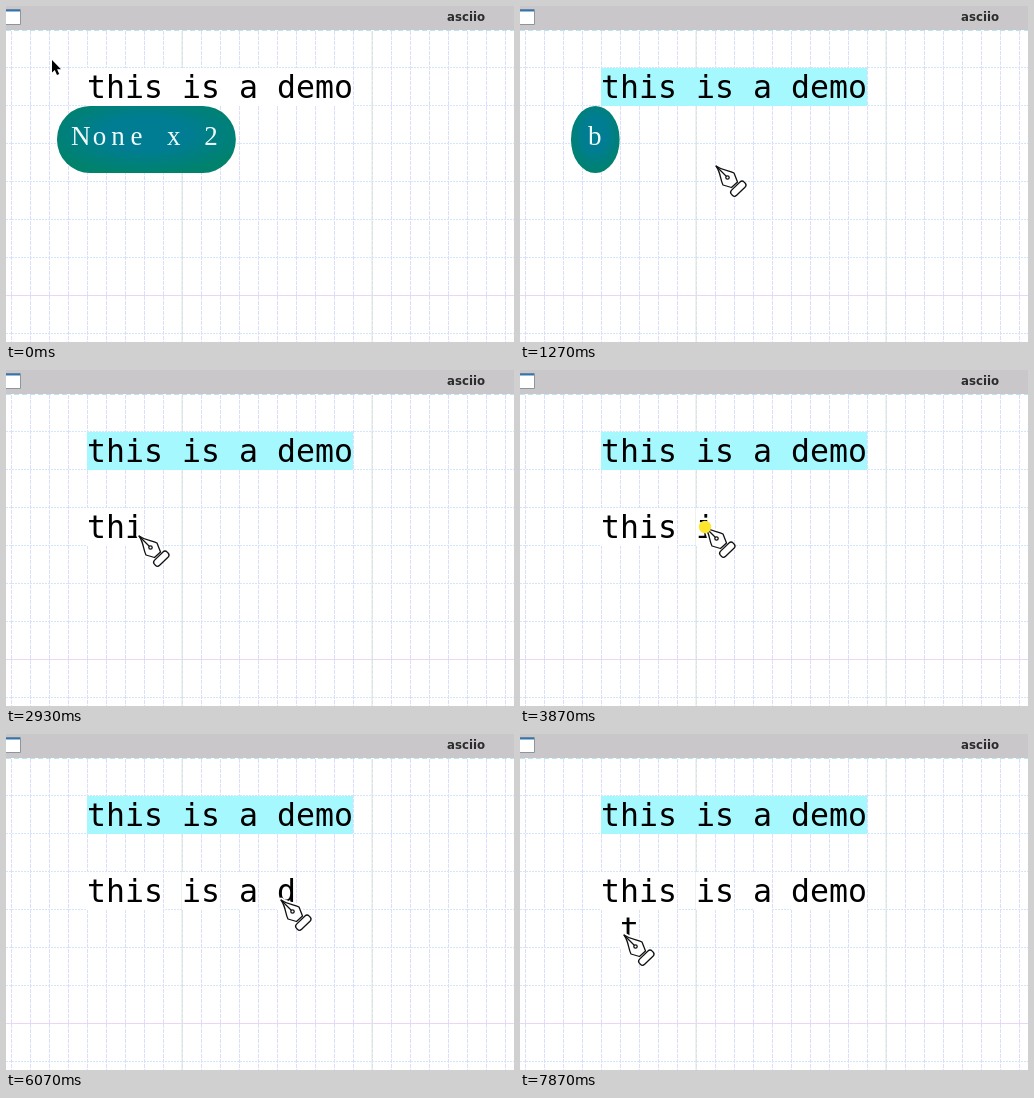
An HTML page that plays this animation: 508x336 px, repeating every 8 s.

```html
<!DOCTYPE html>
<html lang="en">
<head>
<meta charset="utf-8">
<title>asciio</title>
<style>
html, body { margin: 0; width: 100%; height: 100%; overflow: hidden; background: #fff; }
svg { display: block; }
text { white-space: pre; }
.mono { font: 31.56px "DejaVu Sans Mono", monospace; }
.key { font: 27px "Liberation Serif", serif; fill: #eefaf8; text-anchor: middle; }
.title { font: bold 11.75px "DejaVu Sans", sans-serif; fill: #2c2c2c; }
</style>
</head>
<body>
<svg width="508" height="336" viewBox="0 0 508 336">
  <defs>
    <radialGradient id="teal" cx=".5" cy=".42" r=".62">
      <stop offset=".4" stop-color="#007d92"/>
      <stop offset=".95" stop-color="#00826c"/>
    </radialGradient>
    <path id="nib" d="M0 0C7 5 13 4 18 7L21.5 16 15.5 21.5 7 19C4 13 5 7 0 0Z"/>
  </defs>
  <rect width="508" height="336" fill="#fff"/>
  <g id="grid" fill="none"></g>
  <rect id="label" x="81" y="62" width="266" height="38"/>
  <text class="mono" x="81" y="92">this is a demo</text>
  <g id="cells"></g>
  <path id="arrow" d="M0 0V12.5L2.8 10 5 15 7.2 14 5.1 9.2H9Z" stroke="#fff" paint-order="stroke"/>
  <g id="pill"></g>
  <g id="pen" fill="#fff" stroke="#111" stroke-width="1.3" stroke-linejoin="round">
    <use href="#nib" stroke="#fff" stroke-width="5"/>
    <use href="#nib"/>
    <path d="M0 0L10.5 10.5"/>
    <circle cx="11.5" cy="11.5" r="1.7"/>
    <rect x="-8.8" y="-3.6" width="17.6" height="7.2" rx="3" transform="translate(22.3 22.7) rotate(-44)"/>
  </g>
  <circle id="dot" r="6.2" fill="#ffe62e"/>
  <rect width="508" height="24" fill="#c9c7c9"/>
  <path d="M0 24.5H508" stroke="#b9e6ee" stroke-dasharray="5 3"/>
  <path d="M-1 3.5H14.5V18.5H-1" fill="#fff" stroke="#8f959c"/>
  <path d="M0 4.5H14" stroke="#3474ad" stroke-width="2"/>
  <text class="title" x="441" y="14.5">asciio</text>
</svg>
<script>
const NS = "http://www.w3.org/2000/svg";
const $ = id => document.getElementById(id);
const LOOP = 8000, STEP = 200 / 3, CELL = 19, ROW = 38;
const SELECT = 333, PEN = 1267, PILL_END = 2867, DOT = 133;

// Each word is stamped letter by letter; x, y is the pen tip at its first letter
const words = [
  { text: "this", col: 0, row: 3, start: 1867, gap: 433, x: 95, y: 166 },
  { text: "is", col: 5, row: 3, start: 3867, gap: 667, x: 185, y: 157 },
  { text: "a", col: 8, row: 3, start: 5333, gap: 0, x: 245, y: 156 },
  { text: "demo", col: 10, row: 3, start: 5867, gap: 400, x: 275, y: 166 },
  { text: "t", col: 1, row: 4, start: 7600, gap: 0, x: 104, y: 201 }
];
const stops = [
  { at: 0, x: 46, y: 54 }, { at: 400, x: 150, y: 86 }, { at: 667, x: 196, y: 160 }
];
const stamps = [];

function add(parent, name, attrs, text) {
  const el = document.createElementNS(NS, name);
  for (const k in attrs) el.setAttribute(k, attrs[k]);
  if (text) el.textContent = text;
  return parent.appendChild(el);
}

function drawGrid() {
  const grid = $("grid");
  for (let y = 61; y < 336; y += ROW)
    add(grid, "path", { d: `M0 ${y + .5}H508`, stroke: "#d3e6fb", "stroke-dasharray": "2 1" });
  for (let x = 5; x < 508; x += CELL)
    add(grid, "path", { d: `M${x + .5} 25V336`, stroke: "#dcdffb", "stroke-dasharray": "4 1" });
  add(grid, "path", { d: "M0 289.5H508", stroke: "#ecd6f6" });
  add(grid, "path", { d: "M176 25V336M366 25V336", stroke: "#d8e8da" });
}

function makePill(keys) {
  const pitch = 18.6, g = add($("pill"), "g", {});
  add(g, "rect", { x: 51, y: 100, width: keys.length * pitch + 30, height: 67, rx: 33, fill: "url(#teal)" });
  [...keys].forEach((ch, i) =>
    add(g, "text", { x: 65.5 + (i + .5) * pitch, y: 139, class: "key" }, ch));
  return g;
}

function addWord({ text, col, row, start, gap, x, y }) {
  [...text].forEach((ch, i) => {
    const at = start + i * gap, left = 81 + (col + i) * CELL, top = 24 + row * ROW;
    const el = add($("cells"), "g", {});
    add(el, "rect", { x: left, y: top, width: CELL, height: ROW, fill: "#fff" });
    add(el, "text", { x: left, y: top + 30, class: "mono" }, ch);
    stamps.push({ el, at });
    stops.push({ at, x: x + i * CELL, y });
  });
}

drawGrid();
const clickPill = makePill("None x 2"), keyPill = makePill("b");
words.forEach(addWord);

// The pointer rests at a stop, then glides on in the third quarter of the interval
function tipAt(t) {
  const next = stops.find(s => s.at > t);
  const last = stops.filter(s => s.at <= t).pop();
  if (!next) return last;
  const u = (t - last.at) / (next.at - last.at);
  const p = Math.min(1, Math.max(0, (u - .5) * 4));
  const e = p * p * (3 - 2 * p);
  return { x: last.x + (next.x - last.x) * e, y: last.y + (next.y - last.y) * e };
}

const show = (el, on) => el.setAttribute("visibility", on ? "visible" : "hidden");

function draw(ms) {
  const t = Math.floor((ms + 4) / STEP) * STEP + 1;
  const { x, y } = tipAt(t), drawing = t >= PEN;
  for (const id of ["arrow", "pen", "dot"])
    $(id).setAttribute("transform", `translate(${x.toFixed(1)} ${y.toFixed(1)})`);
  $("label").setAttribute("fill", t < SELECT ? "#fff" : "#a6f8ff");
  show($("arrow"), !drawing);
  show($("pen"), drawing);
  show(clickPill, !drawing);
  show(keyPill, drawing && t < PILL_END);
  show($("dot"), stamps.some(s => t >= s.at && t < s.at + DOT));
  for (const s of stamps) show(s.el, t >= s.at);
}

function tick() {
  draw(performance.now() % LOOP);
  requestAnimationFrame(tick);
}
tick();
</script>
</body>
</html>
```
